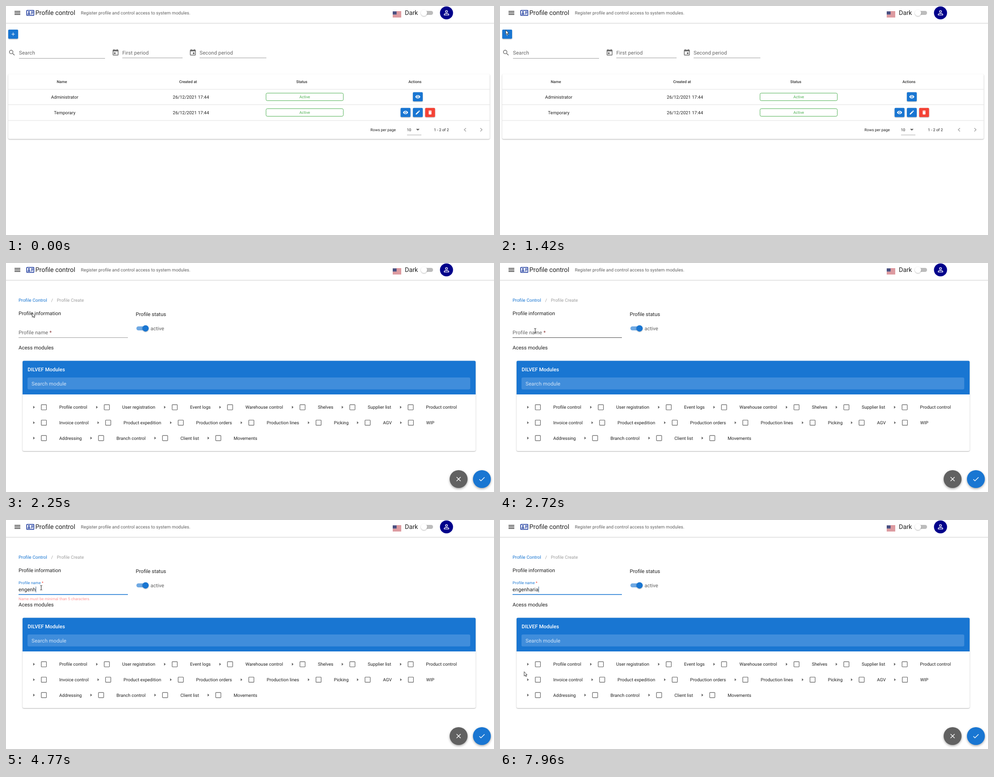
An HTML page that plays this animation: 1089x514 px, repeating every 8 s.

```html
<!DOCTYPE html>
<html lang="en">
<head>
<meta charset="utf-8">
<title>Profile control</title>
<style>
  html, body { margin: 0; width: 100%; height: 100%; overflow: hidden; background: #fff; }
  svg { display: block; width: 1089px; height: 514px; font-family: Roboto, sans-serif; text-rendering: geometricPrecision; }
  .card { filter: drop-shadow(0 1px 1.2px rgba(0,0,0,.32)); }
  .btn { filter: drop-shadow(0 1px 1px rgba(0,0,0,.3)); }
  .fab { filter: drop-shadow(0 2px 2.5px rgba(0,0,0,.35)); }
  .field { letter-spacing: .00937em; }
</style>
</head>
<body>
<svg id="stage" viewBox="0 0 1089 514"></svg>
<script>
const LOOP = 8000;
const BLUE = '#1976d2', RED = '#f44336', ERROR = '#ff5252', GREEN = '#4caf50';
const INK = '#212121', GREY = '#666', LINE = '#e0e0e0';
const XS = 8.6, SM = 10.04, MD = 11.47, LG = 14.3;

const ICONS = {
  menu: 'M3 18h18v-2H3zM3 13h18v-2H3zM3 6v2h18V6z',
  add: 'M19 13h-6v6h-2v-6H5v-2h6V5h2v6h6z',
  search: 'M15.5 14h-.79l-.28-.27A6.47 6.47 0 0 0 16 9.5 6.5 6.5 0 1 0 9.5 16c1.61 0 3.09-.59 4.23-1.57l.27.28v.79l5 4.99L20.49 19zm-6 0a4.5 4.5 0 1 1 0-9 4.5 4.5 0 0 1 0 9z',
  calendar: 'M19 3h-1V1h-2v2H8V1H6v2H5a2 2 0 0 0-2 2v14a2 2 0 0 0 2 2h14a2 2 0 0 0 2-2V5a2 2 0 0 0-2-2zm0 16H5V8h14z',
  eye: 'M12 4.5C7 4.5 2.73 7.61 1 12c1.73 4.39 6 7.5 11 7.5s9.27-3.11 11-7.5c-1.73-4.39-6-7.5-11-7.5zM12 17a5 5 0 1 1 0-10 5 5 0 0 1 0 10zm0-8a3 3 0 1 0 0 6 3 3 0 0 0 0-6z',
  edit: 'M3 17.25V21h3.75L17.81 9.94l-3.75-3.75zM20.71 7.04a1 1 0 0 0 0-1.41l-2.34-2.34a1 1 0 0 0-1.41 0l-1.83 1.83 3.75 3.75z',
  trash: 'M6 19a2 2 0 0 0 2 2h8a2 2 0 0 0 2-2V7H6zM19 4h-3.5l-1-1h-5l-1 1H5v2h14z',
  left: 'M15.41 7.41 14 6l-6 6 6 6 1.41-1.41L10.83 12z',
  right: 'M10 6 8.59 7.41 13.17 12l-4.58 4.59L10 18l6-6z',
  down: 'M6 9.5l6 6 6-6z',
  play: 'M9 6.5v11l6-5.5z',
  close: 'M19 6.41 17.59 5 12 10.59 6.41 5 5 6.41 10.59 12 5 17.59 6.41 19 12 13.41 17.59 19 19 17.59 13.41 12z',
  check: 'M9 16.17 4.83 12l-1.42 1.41L9 19 21 7l-1.41-1.41z',
  person: 'M12 5.9a2.1 2.1 0 1 1 0 4.2 2.1 2.1 0 0 1 0-4.2m0 9c2.97 0 6.1 1.46 6.1 2.1v1.1H5.9V17c0-.64 3.13-2.1 6.1-2.1M12 4a4 4 0 1 0 0 8 4 4 0 0 0 0-8zm0 9c-2.67 0-8 1.34-8 4v3h16v-3c0-2.66-5.33-4-8-4z'
};

// y is the middle of the capital letters
const text = (x, y, str, size, fill = INK, extra = '') =>
  `<text x="${x}" y="${y + size * .355}" font-size="${size}" fill="${fill}" ${extra}>${str}</text>`;
const MID = 'text-anchor="middle"', BOLD = 'font-weight="500"', FIELD = 'class="field"';
const rect = (x, y, w, h, fill, extra = '') =>
  `<rect x="${x}" y="${y}" width="${w}" height="${h}" fill="${fill}" ${extra}/>`;
const circle = (x, y, r, fill, extra = '') => `<circle cx="${x}" cy="${y}" r="${r}" fill="${fill}" ${extra}/>`;
const icon = (name, x, y, fill = GREY, size = 17.2) =>
  `<path d="${ICONS[name]}" fill="${fill}" fill-rule="evenodd" transform="translate(${x - size / 2} ${y - size / 2}) scale(${size / 24})"/>`;
const group = (id, body, extra = '') => `<g id="${id}" ${extra}>${body}</g>`;
const button = (x, y, name, fill) =>
  rect(x - 11, y - 10.3, 22, 20.6, fill, 'rx="2" class="btn"') + icon(name, x, y, '#fff', 12.3);

function flag() {
  let out = rect(863, 12, 19, 13.4, '#f2f2f2');
  for (let i = 0; i < 7; i++) out += rect(863, 12 + i * 2.06, 19, 1.03, '#c8454f');
  return out + rect(863, 12, 8.6, 7.2, '#4a4f80');
}

function header() {
  const navy = '#0b2b96';
  return rect(0, 38, 1089, 1, '#d6d6d6') + rect(0, 39, 1089, 1, '#f3f3f3') +
    icon('menu', 25.5, 15.5, INK) +
    `<rect x="46.2" y="9.7" width="16" height="11.6" rx="1" fill="none" stroke="${navy}" stroke-width="1.5"/>` +
    circle(51.2, 13.6, 1.8, navy) + `<path d="M47.8 18.9c0-3.6 6.8-3.6 6.8 0z" fill="${navy}"/>` +
    rect(56, 12.2, 4.6, 1.3, navy) + rect(56, 14.7, 4.6, 1.3, navy) + rect(56, 17.2, 3, 1.3, navy) +
    text(65.5, 15.3, 'Profile control', LG) +
    text(167, 15.1, 'Register profile and control access to system modules.', SM, '#616161') +
    flag() + text(890, 15.3, 'Dark', LG) +
    rect(929, 11, 24, 9, '#bcbcbc', 'rx="4.5"') + circle(932.7, 15.5, 7, '#fff', 'class="btn"') +
    circle(983, 15.5, 14.6, '#00008b') + icon('person', 983, 15.3, '#fff');
}

const searchField = () => icon('search', 13.4, 105) + text(29, 105.4, 'Search', MD, GREY, FIELD) +
  rect(29, 117, 192, 1, '#9a9a9a');

const period = (x, label, end, mark) => icon('calendar', x - 15, 104.6) + rect(x - 15 + mark, 104.2, 3.6, 3.6, GREY) +
  text(x, 105, label, MD, GREY, FIELD) + rect(x, 116, end - x, 1, '#9a9a9a');

function table(columns, badgeWidth, withActions) {
  const heads = ['Name', 'Created at', 'Status', 'Actions'];
  const [name, created, status, actions] = columns;
  let out = rect(5, 153, 1074.5, 145.5, '#fff', 'rx="3" class="card"');
  if (withActions) out += rect(5, 187, 1074.5, 34.5, '#f7f7f7', 'id="row0"') + rect(5, 222, 1074.5, 35, '#f7f7f7', 'id="row1"');
  heads.forEach((h, i) => out += text(columns[i] - 6.4, 169.5, h, XS, '#333', MID + ' ' + BOLD));
  [186.5, 221, 256.5].forEach(y => out += rect(5, y, 1074.5, 1, LINE));
  ['Administrator', 'Temporary'].forEach((who, i) => {
    const y = 204 + 35 * i;
    out += text(name, y, who, SM, INK, MID) + text(created, y, '26/12/2021 17:44', SM, INK, MID) +
      `<rect x="${status - badgeWidth / 2}" y="${y - 8.5}" width="${badgeWidth}" height="17" rx="3" fill="none" stroke="${GREEN}"/>` +
      text(status, y - .3, 'Active', XS, GREEN, MID);
  });
  if (withActions) out += button(actions, 203.8, 'eye', BLUE) + button(actions - 27.4, 239, 'eye', BLUE) +
    button(actions, 239, 'edit', BLUE) + button(actions + 27.4, 239, 'trash', RED);
  return out + text(813.3, 277.8, 'Rows per page', XS) + text(894.5, 277.8, '10', XS) +
    icon('down', 919, 277.5, '#616161', 16) + rect(895, 289, 32, 1, '#a5a5a5') +
    text(955, 277.8, '1 - 2 of 2', XS) + icon('left', 1024.5, 277.8, '#a0a0a0') + icon('right', 1060.5, 277.8, '#a0a0a0');
}

const listPage = () => button(16, 63.2, 'add', BLUE) + searchField() +
  period(259.5, 'First period', 394, -3.6) + period(432, 'Second period', 581, 0) +
  table([131, 412.7, 666.5, 919], 172.5, true);

const leavingPage = () => `<g transform="translate(0 -21)">${searchField()}</g>` +
  `<g transform="translate(0 -22)">${table([152.5, 482.3, 779.5, 993.2], 206, false)}</g>`;

function modules() {
  const rows = [
    [[84.5, 'Profile control'], [225, 'User registration'], [376.5, 'Event logs'], [500, 'Warehouse control'],
      [661.7, 'Shelves'], [773, 'Supplier list'], [903, 'Product control']],
    [[84.5, 'Invoice control'], [228, 'Product expedition'], [390, 'Production orders'], [547.5, 'Production lines'],
      [697.5, 'Picking'], [807, 'AGV'], [903.5, 'WIP']],
    [[84.5, 'Addressing'], [212.2, 'Branch control'], [355, 'Client list'], [473.7, 'Movements']]
  ];
  return rows.map((row, i) => row.map(([x, label]) => {
    const y = 323.8 + 34.6 * i;
    return icon('play', x - 22, y, '#616161', 14) +
      `<rect x="${x - 5.8}" y="${y - 5.8}" width="11.6" height="11.6" rx="1" fill="none" stroke="#757575" stroke-width="1.4"/>` +
      text(x + 34.3, y, label, SM);
  }).join('')).join('');
}

const formPage = () =>
  text(28, 83.5, 'Profile Control', SM, BLUE) + text(100.8, 83.5, '/', SM, '#9e9e9e') + text(113.5, 83.5, 'Profile Create', SM, '#9e9e9e') +
  text(28, 113.2, 'Profile information', MD) + text(289.6, 115.2, 'Profile status', MD) +
  rect(291, 142.3, 25, 9, '#6fa9e3', 'rx="4.5"') + circle(311.4, 146.8, 7.1, BLUE, 'class="btn"') +
  text(322.5, 146.5, 'active', MD, '#616161') + text(28, 190.2, 'Acess modules', MD) +
  rect(28, 167, 244, 1, '#9a9a9a', 'id="rule"') + rect(28, 166.5, 244, 1.6, BLUE, 'id="focusRule"') +
  group('label', `<text class="field" font-size="${MD}">Profile name <tspan id="star">*</tspan></text>`) +
  text(28, 155.7, '', MD, INK, 'id="entry" class="field"') + rect(0, 149.5, 1, 13, INK, 'id="caret"') +
  text(28, 177.4, 'Name must be minimal than 5 characters.', XS, ERROR, 'id="error"') +
  `<g class="card">${rect(37, 219.5, 1011, 202.5, '#fff', 'rx="3"')}
    <path d="M37 295V222.5a3 3 0 0 1 3-3H1045a3 3 0 0 1 3 3V295z" fill="${BLUE}"/></g>` +
  text(48.3, 239.3, 'DILVEF Modules', MD, '#fff', BOLD) +
  rect(48, 257, 988, 26.7, '#408ddb', 'rx="3"') + text(57, 270.5, 'Search module', MD, '#d3e4f6', FIELD) +
  modules() +
  circle(1010, 485, 20, '#616161', 'class="fab"') + icon('close', 1010, 485, '#fff') +
  circle(1062, 485, 20, BLUE, 'class="fab"') + icon('check', 1062, 485, '#fff');

const linkHint = () => `<path d="M0 501H110.500a2 2 0 0 1 2 2V514H0z" fill="#6a0f18"/>` +
  text(107, 508.6, 'localhost:3028/profiles/create', 7.85, '#f4e6e6', `text-anchor="end" style="font-family:'Open Sans',sans-serif"`);

const pointer = () =>
  group('arrow', '<path d="M.4.5V10.200L2.700 8.200 4.200 11.500 5.700 10.800 4.300 7.600H7.100z" fill="#fff" stroke="#222" stroke-width=".9" stroke-linejoin="round"/>') +
  group('beam', '<path d="M-2.300-5H-.5L0-4.500.5-5H2.300M0-4.500V4.500M-2.300 5H-.5L0 4.500.5 5H2.300" fill="none" stroke="#222"/>');

document.getElementById('stage').innerHTML = rect(0, 0, 1089, 514, '#fff') + header() +
  group('list', listPage()) + group('leaving', leavingPage()) + group('form', formPage()) +
  group('hint', linkHint()) + group('pointer', pointer());

const el = id => document.getElementById(id);
const show = (id, on) => el(id).setAttribute('visibility', on ? 'inherit' : 'hidden');
const set = (id, attrs) => { for (const k in attrs) el(id).setAttribute(k, attrs[k]); };
const ramp = (t, from, to) => Math.min(1, Math.max(0, (t - from) / (to - from)));
const ease = k => k * k * (3 - 2 * k);

// time, x, y
const PATH = [
  [330, 930, 485], [610, 359, 367], [810, 359, 367], [1280, 2, 27], [1420, 12.5, 53.5], [1560, 19, 57], [1990, 19, 57],
  [2370, 70, 128], [2720, 78.5, 152], [6380, 78.5, 152], [6750, 123, 169], [6980, 123, 169],
  [7290, 134, 215], [7760, 71, 302], [7800, 71, 302], [7960, 53.5, 340]
];
const WORD = 'engenharia';
const KEYS = [3810, 4010, 4220, 4430, 4630, 4770, 4910, 5190, 5330, 5450];
const LEAVE = 1770, ARRIVE = 1990, FOCUS = 2860;

function pointerAt(t) {
  const i = PATH.findIndex(p => p[0] > t);
  if (i < 0) return PATH[PATH.length - 1].slice(1);
  if (i === 0) return PATH[0].slice(1);
  const [t0, x0, y0] = PATH[i - 1], [t1, x1, y1] = PATH[i];
  const k = ease(ramp(t, t0, t1));
  return [x0 + (x1 - x0) * k, y0 + (y1 - y0) * k];
}

function caretOn(t) {
  if (t < FOCUS) return false;
  if (t < KEYS[0]) return t < 3360;
  return t < 5980 || Math.floor((t - 5980) / 505) % 2 === 1;
}

function drawField(t, hovered) {
  const focus = ease(ramp(t, FOCUS, 3140));
  const count = KEYS.filter(k => k <= t).length;
  const invalid = count > 0 && count < 5;
  const accent = invalid ? ERROR : BLUE;
  const scale = 1 - .25 * focus;
  set('label', {
    transform: `translate(28 ${159.7 - 15.4 * focus}) scale(${scale})`,
    fill: t < FOCUS ? GREY : accent
  });
  set('star', { fill: invalid ? '#333' : t < FOCUS ? '#8a3a3a' : RED });
  set('rule', { fill: hovered ? '#444' : '#9a9a9a' });
  set('focusRule', { x: 150 - 122 * focus, width: 244 * focus, fill: accent });
  el('entry').textContent = WORD.slice(0, count);
  show('caret', caretOn(t));
  set('caret', { x: 28 + (count ? el('entry').getComputedTextLength() : 0), fill: invalid ? ERROR : '#34597f' });
  set('error', { opacity: t < KEYS[4] ? ramp(t, KEYS[0], 4060) : 1 - ramp(t, KEYS[4], 4980) });
}

function draw(t) {
  const [x, y] = pointerAt(t);
  const onForm = t >= ARRIVE;
  const inField = onForm && x > 28 && x < 272 && y > 131 && y < 168;
  show('list', t < LEAVE);
  show('leaving', t >= LEAVE && !onForm);
  show('form', onForm);
  show('hint', t >= 1630 && t < 2100);
  const overTable = t >= 330 && t < LEAVE && x > 5 && x < 1079;
  show('row0', overTable && y > 187 && y < 221);
  show('row1', overTable && y >= 222 && y < 257);
  if (onForm) drawField(t, inField); else { show('caret', false); }
  show('pointer', t >= 330);
  set('pointer', { transform: `translate(${x} ${y})` });
  set('arrow', { display: inField ? 'none' : 'inline' });
  set('beam', { display: inField ? 'inline' : 'none' });
}

function tick() {
  draw(performance.now() % LOOP);
  requestAnimationFrame(tick);
}
tick();
</script>
</body>
</html>
```
